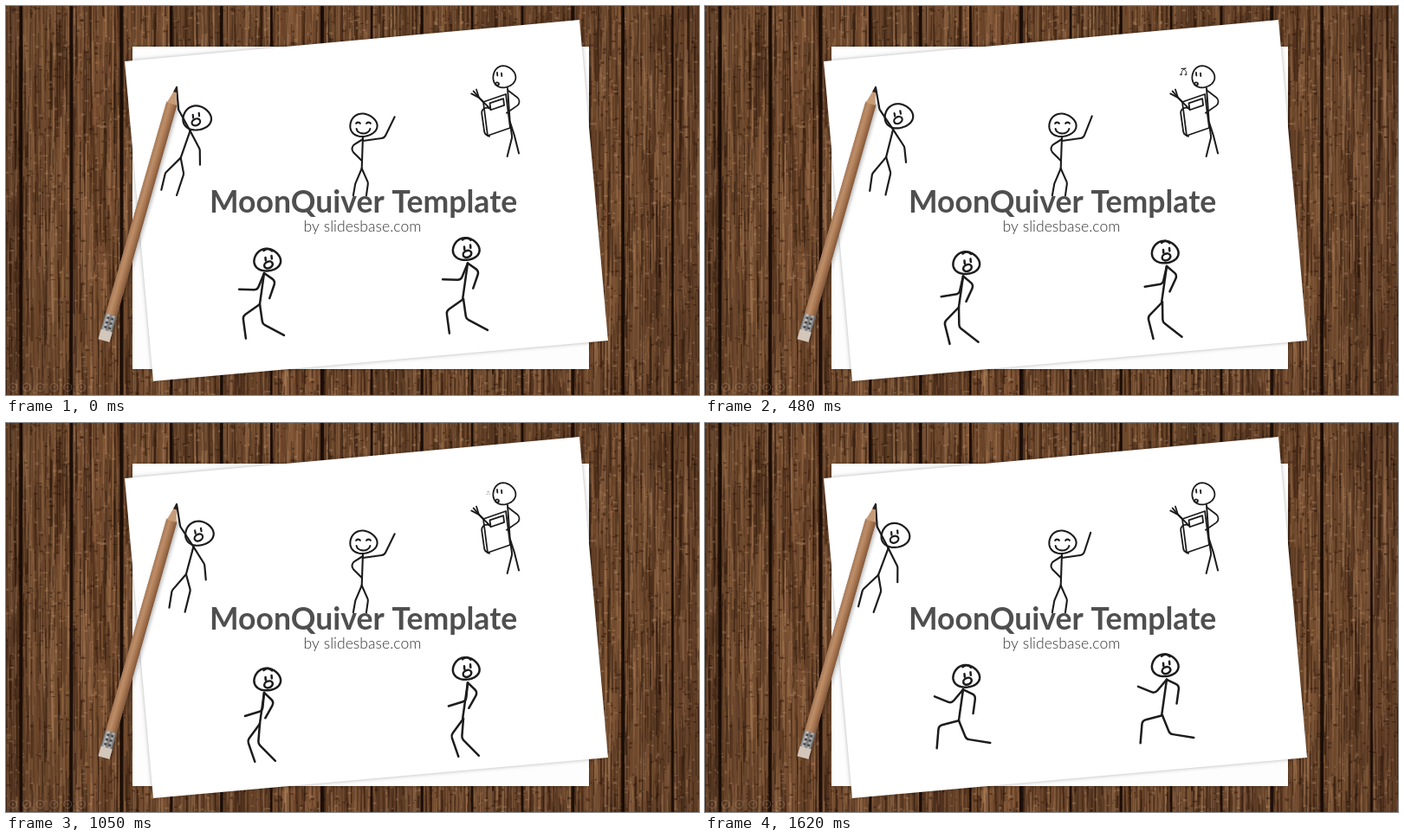
Animation, 800 px wide and 450 px high, one loop 1650 ms. Source, as an HTML page with a canvas:

```html
<!DOCTYPE html>
<html lang="en">
<head>
<meta charset="utf-8">
<title>Stick figures on paper</title>
<style>
html, body { margin: 0; width: 100%; height: 100%; overflow: hidden; background: #5f3f28; }
canvas { display: block; width: 800px; height: 450px; }
</style>
</head>
<body>
<canvas id="stage" width="800" height="450"></canvas>
<script>
const W = 800, H = 450, LOOP = 1650, STEP = 30;
const INK = '#1c1c1c';
const stage = document.getElementById('stage').getContext('2d');
const backdrop = document.createElement('canvas');
backdrop.width = W;
backdrop.height = H;
let g = backdrop.getContext('2d');

let seed = 41;
const rand = (a = 0, b = 1) => {
  seed = (seed * 16807) % 2147483647;
  return a + (b - a) * seed / 2147483647;
};
const rad = deg => deg * Math.PI / 180;
const wave = (t, peak, period) => Math.cos((t - peak) / period * 2 * Math.PI);
const clamp = v => Math.max(0, Math.min(1, v));

function pen(width) {
  g.strokeStyle = INK;
  g.lineWidth = width;
  g.lineCap = g.lineJoin = 'round';
}

function at(x, y, paint) {
  g.save();
  g.translate(x, y);
  paint();
  g.restore();
}

function polygon(points, fill) {
  g.beginPath();
  points.forEach(p => g.lineTo(...p));
  g.closePath();
  if (fill) {
    g.fillStyle = fill;
    g.fill();
  }
}

// Limb of bones given as [degrees clockwise from right, length], with rounded joints.
function limb(x, y, ...bones) {
  const points = bones.map(([angle, length]) =>
    [x += length * Math.cos(rad(angle)), y += length * Math.sin(rad(angle))]);
  g.beginPath();
  g.moveTo(x - bones.reduce((s, [a, l]) => s + l * Math.cos(rad(a)), 0),
    y - bones.reduce((s, [a, l]) => s + l * Math.sin(rad(a)), 0));
  points.forEach((p, i) => points[i + 1] ? g.arcTo(...p, ...points[i + 1], 6) : g.lineTo(...p));
  g.stroke();
  return [x, y];
}

function oval(x, y, rx, ry, tilt = 0, from = 0, to = 360) {
  g.beginPath();
  g.ellipse(x, y, rx, ry, rad(tilt), rad(from), rad(to));
  g.stroke();
}

// Hand-drawn head: an ellipse with a slight wobble.
function head(rx, ry, wobble) {
  g.beginPath();
  for (let a = 0; a < 360; a += 6) {
    const k = 1 + .035 * Math.sin(rad(3 * a + wobble));
    g.lineTo(rx * k * Math.cos(rad(a)), ry * k * Math.sin(rad(a)));
  }
  g.closePath();
  g.stroke();
}

function scaredFace(x, y) {
  for (const side of [-1, 1]) limb(x + side * 3.5, y - 5 - side, [85, 3.5]);
  oval(x, y + 4.5, 5, 3.8, -25);
}

function wood() {
  const pitch = 57.9;
  for (let left = 17 - pitch; left < W; left += pitch) {
    const tone = rand(.88, 1.08);
    g.save();
    g.beginPath();
    g.rect(left, 0, pitch, H);
    g.clip();
    g.fillStyle = `rgb(${110 * tone},${72 * tone},${44 * tone})`;
    g.fillRect(left, 0, pitch, H);
    for (let i = 0; i < 420; i++) {
      const x = left + rand(0, pitch), y = rand(-80, H), length = rand(8, 150), dark = rand() < .53;
      g.strokeStyle = dark ? `rgba(40,20,9,${rand(.1, .5)})` : `rgba(184,138,98,${rand(.05, .38)})`;
      g.lineWidth = rand(.5, 2.5);
      g.beginPath();
      g.moveTo(x, y);
      g.quadraticCurveTo(x + rand(-2, 2), y + length / 2, x + rand(-1, 1), y + length);
      g.stroke();
    }
    for (let i = 0; i < 260; i++) {
      g.fillStyle = rand() < .5 ? 'rgba(35,17,8,.4)' : 'rgba(200,155,118,.3)';
      g.fillRect(left + rand(0, pitch), rand(0, H), rand(1, 5), rand(1, 3));
    }
    g.restore();
    g.fillStyle = 'rgba(20,9,5,.9)';
    g.fillRect(left - 1.5, 0, rand(2.5, 4.5), H);
  }
  const vignette = g.createRadialGradient(400, 230, 300, 400, 230, 500);
  vignette.addColorStop(0, 'rgba(20,8,2,0)');
  vignette.addColorStop(1, 'rgba(20,8,2,.2)');
  g.fillStyle = vignette;
  g.fillRect(0, 0, W, H);
}

function papers() {
  g.save();
  g.shadowColor = 'rgba(0,0,0,.3)';
  g.shadowBlur = 4;
  polygon([[146, 47], [673, 47], [673, 420], [146, 420]], '#fdfdfd');
  polygon([[137, 64], [662, 16], [695, 387], [170, 434]], '#fff');
  g.restore();
}

function pencil() {
  const across = (...colors) => {
    const fill = g.createLinearGradient(0, -6.5, 0, 6.5);
    colors.forEach((c, i) => fill.addColorStop(i / (colors.length - 1), c));
    return fill;
  };
  // Tapers from the given half-width to a second one.
  const section = (from, to, r1, r2, fill) => polygon([[from, -r1], [to, -r2], [to, r2], [from, r1]], fill);
  at(197, 93, () => {
    g.rotate(Math.atan2(294, -84));
    g.save();
    g.shadowColor = 'rgba(0,0,0,.3)';
    g.shadowBlur = 4;
    g.shadowOffsetX = 2;
    section(20, 304, 6.3, 6.5, '#a3744f');
    g.restore();
    section(0, 22, 0, 6, '#c69c78');
    section(0, 7, .6, 2, '#252321');
    section(21, 276, 6.2, 6.5, across('#80563a', '#a6754f', '#bd8e69', '#a87a56'));
    section(275, 295, 6.6, 6.8, across('#5c5c5c', '#b5b5b5', '#777', '#c9c9c9', '#777'));
    g.fillStyle = '#484848';
    for (let i = 0; i < 6; i++) g.fillRect(278 + i % 3 * 5.5, i < 3 ? -4 : 1, 2.5, 3);
    section(294, 306, 6.8, 6.8, '#d3c6bb');
  });
}

function titles() {
  g.textAlign = 'left';
  g.fillStyle = '#4f4f4f';
  g.font = 'bold 35.6px Lato, sans-serif';
  g.fillText('MoonQuiver Template', 235, 238.5);
  g.textAlign = 'center';
  g.fillStyle = '#333';
  g.font = '300 17.6px Lato, sans-serif';
  g.fillText('by slidesbase.com', 411.5, 261);
}

function controls() {
  g.strokeStyle = 'rgba(205,185,165,.3)';
  g.lineWidth = 1;
  for (let x = 8; x < 90; x += 15.8) {
    oval(x, 441, 4.5, 4.5);
    limb(x - 1.5, 441, [0, 3]);
  }
}

function swinger(sway) {
  at(197, 94, () => {
    g.rotate((4.8 - 9.4 * sway) / 120);
    pen(2.2);
    const shoulder = limb(0, 0, [80, 26], [56, 28]);
    const hip = limb(...shoulder, [104, 33]);
    limb(...hip, [130, 25], [98, 20]);
    limb(...hip, [74, 19], [103, 26]);
    limb(...shoulder, [57, 24], [84, 18]);
    at(26.5, 33.5, () => {
      g.rotate(rad(-6));
      head(16.3, 14, 40);
      scaredFace(-1, 0);
    });
  });
}

function waver(swing) {
  pen(2.1);
  const hip = limb(412, 151, [92, 37]);
  limb(...hip, [113, 19], [100, 14]);
  limb(...hip, [66, 18], [98, 15]);
  limb(412, 154, [148, 19], [45, 21]);
  limb(412, 156, [-8, 25], [-67 + 7.5 * swing, 27]);
  at(412.5, 138, () => {
    head(15.6, 13.2, 60);
    for (const x of [-6, 6]) oval(x, -1.5, 2.5, 1.8, 0, 200, 340);
    oval(0, 3, 8, 6.5, 0, 10, 170);
  });
}

function book() {
  const spot = (u, v) => [551 + 26 * u + 5 * v, 111 - 9 * u + 39 * v];
  const panel = (u, v, w, h) => {
    polygon([spot(u, v), spot(u + w, v), spot(u + w, v + h), spot(u, v + h)], '#fff');
    g.stroke();
  };
  pen(1.8);
  panel(0, 0, 1, 1);
  panel(.27, .1, .6, .2);
  limb(...spot(0, 0), [225, 6], [82, 42], [25, 6]);
  for (let i = 0; i < 3; i++) limb(...spot(0, 0), [225, 7], [208 + 22 * i, 10]);
}

function reader() {
  pen(2);
  const hip = limb(579, 95, [86, 39]);
  limb(...hip, [82, 18], [104, 23]);
  limb(...hip, [72, 17], [76, 21]);
  book();
  limb(580, 98, [37, 21], [145, 23]);
  pen(1.8);
  at(575, 82, () => {
    head(13, 12.5, 60);
    for (const x of [-8, -3]) limb(x, -4 + x / 8, [85, 3.5]);
    oval(-8, 8, 2, 1.6);
  });
}

// A music note drifts up from the mouth and fades, every 780 ms.
function note(t) {
  const age = t - 150;
  if (age < 0) return;
  const phase = age % 780, rise = clamp((phase - 40) / 320);
  const alpha = clamp(phase / 360) * clamp((540 - phase) / 160);
  at(558 - 6.5 * rise, 83 - 7.5 * rise, () => {
    g.globalAlpha = alpha;
    g.scale(.3 + .7 * rise, .3 + .7 * rise);
    pen(1);
    limb(-2, 3, [-90, 7], [-5, 6], [90, 7]);
    for (const x of [-3, 3]) oval(x, 3.3, 1, .7);
  });
}

// The stride runs from 0, legs together, to 1, legs wide apart.
function runner(x, y, stretch, stride) {
  const swing = (start, change) => start + change * stride;
  at(x, y, () => {
    pen(2.5);
    const neck = [5, -36 - stretch];
    limb(...neck, [98, 36 + stretch]);
    limb(...neck, [swing(91, 47), 21], [swing(158, 53), 21]);
    limb(...neck, [swing(46, -24), 16], [swing(122, -29), 21]);
    limb(0, 0, [swing(121, 53), 24], [swing(68, 32), 26]);
    limb(0, 0, [swing(98, -36), 23], [swing(50, -49), 28]);
    at(8.5 - stretch, -51 - 1.2 * stretch, () => {
      head(15.3, 12.8, 30);
      scaredFace(1.5, 1);
      limb(-4, -11, [-35, 6], [40, 6]);
    });
  });
}

function draw(t) {
  const sway = wave(t, 330, 900), bob = 3 * sway;
  const stride = (1 + wave(t, 330, 450)) / 2;
  g.drawImage(backdrop, 0, 0);
  swinger(sway);
  pencil();
  waver(wave(t, 190, 1050));
  reader();
  note(t);
  runner(293, 347 + bob, 0, stride);
  runner(528, 341 + bob, 5.5, stride);
  titles();
}

wood();
papers();
controls();
g = stage;
const start = performance.now();
function tick() {
  const t = (performance.now() - start) % LOOP;
  draw(Math.floor(t / STEP) * STEP);
  requestAnimationFrame(tick);
}
tick();
</script>
</body>
</html>
```
